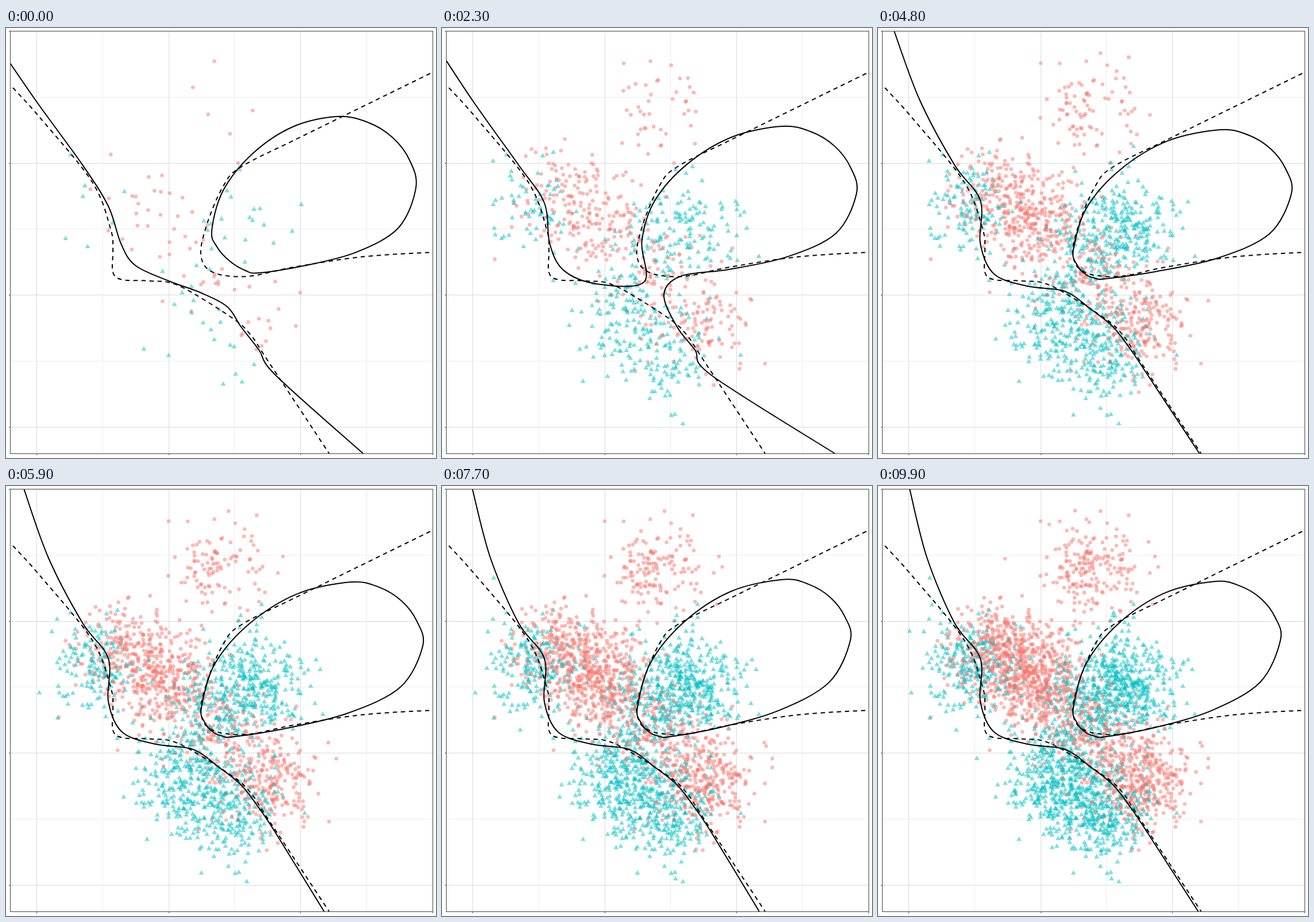
Animation, 748 px wide and 748 px high, one loop 10000 ms. Source, as an HTML page with a canvas:

```html
<!DOCTYPE html>
<html lang="en">
<head>
<meta charset="utf-8">
<title>Decision boundary</title>
<style>
  html, body { margin: 0; width: 100%; height: 100%; overflow: hidden; background: #fff; }
  canvas { display: block; width: 748px; height: 748px; }
</style>
</head>
<body>
<canvas id="plot" width="748" height="748"></canvas>
<script>
const ctx = document.getElementById('plot').getContext('2d');
const STEP = 100, STEPS = 100, FIRST = 110, PER_STEP = 33, SPREAD = 42;
const mix = (a, b, t) => a + (b - a) * t;

// ---- sample points: one Gaussian mixture per class ----
const cluster = (x, y, share) => ({ x, y, share });
const classes = [
  {
    color: 'rgba(248,118,109,.5)', round: true,
    clusters: [cluster(372, 143, .14), cluster(210, 287, .22), cluster(280, 345, .29),
      cluster(370, 430, .13), cluster(460, 510, .22)]
  },
  {
    color: 'rgba(0,191,196,.5)', round: false,
    clusters: [cluster(165, 318, .13), cluster(432, 345, .27), cluster(360, 380, .12),
      cluster(310, 505, .23), cluster(385, 565, .25)]
  }
];

let seed = 20417;
function rand() {
  seed = (seed + 0x6D2B79F5) | 0;
  let t = Math.imul(seed ^ (seed >>> 15), 1 | seed);
  t = (t + Math.imul(t ^ (t >>> 7), 61 | t)) ^ t;
  return ((t ^ (t >>> 14)) >>> 0) / 4294967296;
}

function sample() {
  const kind = classes[rand() < .5 ? 0 : 1];
  let pick = rand();
  const c = kind.clusters.find(c => (pick -= c.share) < 0) || kind.clusters[0];
  const r = SPREAD * Math.sqrt(-2 * Math.log(1 - rand()));
  const a = 2 * Math.PI * rand();
  return { kind, x: c.x + r * Math.cos(a), y: c.y + r * Math.sin(a) };
}

const points = Array.from({ length: FIRST + PER_STEP * STEPS }, sample);

// ---- fitted boundary ----
// top, bottom: where the edge leaves the plot; crownX, crownY, right: extent of the loop
const fit = (step, top, bottom, crownX, crownY, right) =>
  ({ step, top, bottom, crownX, crownY, right });
const fits = [
  fit(0, -31, 621, 575, 154, 713),
  fit(23, -26, 683, 591, 171, 721),
  fit(33, 38, 573, 573, 178, 685),
  fit(48, 28, 559, 595, 177, 719),
  fit(69, 34, 548, 605, 158, 730),
  fit(86, 74, 556, 578, 168, 688),
  fit(99, 55, 557, 586, 166, 700)
];
const isJoined = step => step >= 10 && step < 40;

function fitAt(step) {
  const i = Math.max(1, fits.findIndex(f => f.step >= step));
  const a = fits[i - 1], b = fits[i], t = (step - a.step) / (b.step - a.step);
  const f = {};
  for (const name in a) f[name] = mix(a[name], b[name], t);
  f.early = Math.max(0, 1 - step / 40);
  return f;
}

function cubic(a, b, c, d, n = 4) {
  return Array.from({ length: n }, (_, i) => {
    const t = i / n, s = 1 - t;
    return [0, 1].map(k => s * s * s * a[k] + 3 * s * s * t * b[k] + 3 * s * t * t * c[k] + t * t * t * d[k]);
  });
}

function edgeParts({ top, bottom, early }) {
  const bend = .5 - .0013 * (top + 31);
  return {
    upper: [[top, 5], [mix(top, 133, bend), 125], [133, 238], [178, 300 + 10 * early],
      [178 + 22 * early, 375], [202 + 23 * early, 428 - 15 * early],
      [260 + 23 * early, 449 - 9 * early]],
    middle: [[325 + 15 * early, 458 + 3 * early], [370 + 15 * early, 489 - 4 * early]],
    lower: [[409, 520], [440, 560], [470, 605], [bottom, 740]]
  };
}

// Left side, crown, right side and foot, joined by Bezier arcs
function loopParts({ crownX, crownY, right, early }) {
  const left = [340 + 18 * early, 385 - 33 * early];
  const crown = [crownX, crownY];
  const rx = right - crownX, ry = .9 * rx;
  const side = [right, crownY + ry];
  const foot = [397 + 43 * early, 436 - 10 * early];
  return {
    over: [
      ...cubic(left, [left[0], mix(left[1], crownY, .455)], [mix(crownX, left[0], .47), crownY], crown),
      ...cubic(crown, [crownX + .55 * rx, crownY], [right, side[1] - .55 * ry], side),
      ...cubic(side, [right, side[1] + 115], [foot[0] + 85, foot[1] - 13], foot),
      foot
    ],
    under: cubic(foot, [foot[0] - 26, foot[1] + 4], [left[0], left[1] + 40], left).slice(1)
  };
}

function boundary(step) {
  const f = fitAt(step);
  const { upper, middle, lower } = edgeParts(f);
  const { over, under } = loopParts(f);
  if (isJoined(step)) {
    const neck = [330 + 50 * f.early, 442], pinch = [386, 464];
    spline([...upper, neck, ...over, pinch, ...lower]);
  } else {
    spline([...upper, ...middle, ...lower]);
    spline([...over, ...under], true);
  }
}

// ---- fixed dashed boundary ----
const trueEdge = [[12, 104], [60, 157], [150, 268], [182, 350], [186, 385], [186, 425],
  [203, 438], [250, 440], [300, 448], [390, 502], [425, 533], [455, 578], [562, 740]];
const trueWedge = [[738, 79], [520, 186], [410, 241], [378, 275], [350, 340], [339, 395],
  [360, 425], [420, 432], [500, 416], [620, 398], [743, 390]];

// ---- drawing ----
function spline(pts, closed) {
  const n = pts.length;
  const p = i => pts[closed ? (i + n) % n : Math.max(0, Math.min(n - 1, i))];
  ctx.beginPath();
  ctx.moveTo(...pts[0]);
  for (let i = 0; i < (closed ? n : n - 1); i++) {
    const [a, b, c, d] = [p(i - 1), p(i), p(i + 1), p(i + 2)];
    ctx.bezierCurveTo(
      b[0] + (c[0] - a[0]) / 6, b[1] + (c[1] - a[1]) / 6,
      c[0] - (d[0] - b[0]) / 6, c[1] - (d[1] - b[1]) / 6, c[0], c[1]);
  }
  if (closed) ctx.closePath();
  ctx.stroke();
}

function line(x1, y1, x2, y2) {
  ctx.beginPath();
  ctx.moveTo(x1, y1);
  ctx.lineTo(x2, y2);
  ctx.stroke();
}

function grid(color, xs, ys) {
  ctx.strokeStyle = color;
  xs.forEach(x => line(x, 5, x, 740));
  ys.forEach(y => line(8, y, 743, y));
}

function marker({ kind, x, y }) {
  ctx.fillStyle = kind.color;
  ctx.beginPath();
  if (kind.round) {
    ctx.arc(x, y, 3.3, 0, 2 * Math.PI);
  } else {
    ctx.moveTo(x, y - 5);
    ctx.lineTo(x + 4.4, y + 2.8);
    ctx.lineTo(x - 4.4, y + 2.8);
  }
  ctx.fill();
}

function draw(step) {
  ctx.fillStyle = '#fff';
  ctx.fillRect(0, 0, 748, 748);
  ctx.lineWidth = 1;
  grid('#ededed', [168.5, 397.5, 627.5], [120.5, 349.5, 579.5]);
  grid('#dadada', [53.5, 283.5, 512.5], [235.5, 464.5, 694.5]);

  ctx.save();
  ctx.beginPath();
  ctx.rect(7, 5, 736, 736);
  ctx.clip();
  points.slice(0, FIRST + PER_STEP * step).forEach(marker);
  ctx.strokeStyle = '#000';
  ctx.lineWidth = 2;
  boundary(step);
  ctx.setLineDash([7.5, 6.5]);
  spline(trueEdge);
  spline(trueWedge);
  ctx.restore();

  ctx.lineWidth = 1;
  ctx.strokeStyle = '#444';
  ctx.strokeRect(7.5, 5.5, 735, 735);
  [5.5, 235.5, 464.5, 694.5].forEach(y => line(5, y, 8, y));
  [53.5, 283.5, 512.5, 742.5].forEach(x => line(x, 740, x, 743));
}

let shown = -1;
const start = performance.now();
function tick() {
  const step = Math.floor((performance.now() - start) / STEP) % STEPS;
  if (step !== shown) draw(shown = step);
  requestAnimationFrame(tick);
}
tick();
</script>
</body>
</html>
```
